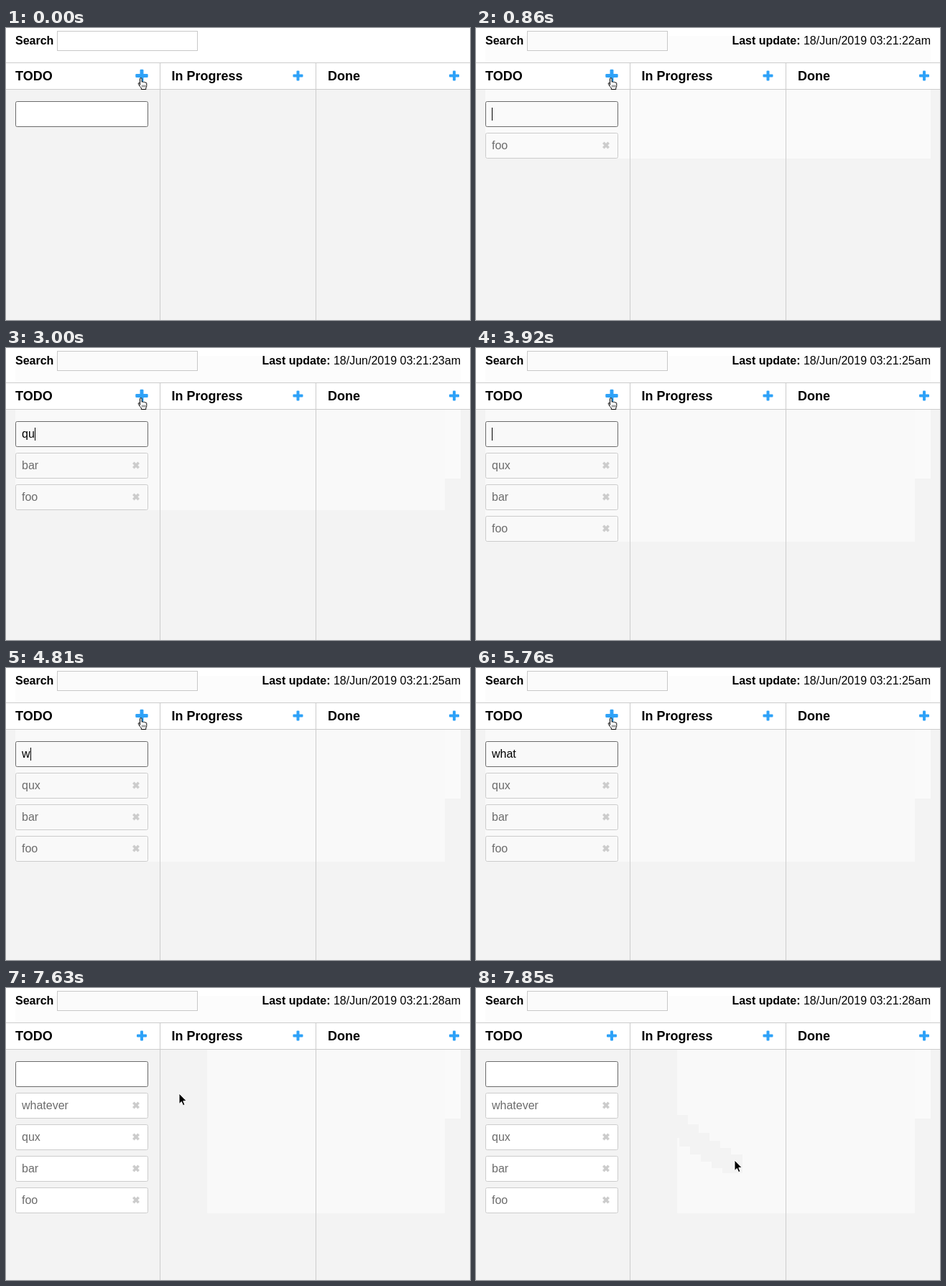
These frames come from a looping animation (646 px wide and 407 px high, 8000 ms). An HTML page:

```html
<!DOCTYPE html>
<html lang="en">
<head>
<meta charset="utf-8">
<title>Task board</title>
<style>
html, body { margin: 0; width: 100%; height: 100%; overflow: hidden; background: #fff; }
svg { display: block; font: 16px "Liberation Sans", Arial, sans-serif; }
.bold { font-weight: bold; }
.head { font-weight: bold; font-size: 18px; }
</style>
</head>
<body>
<svg id="stage" width="646" height="407" viewBox="0 0 646 407"></svg>
<script>
const LOOP = 8000, MOVE_START = 7510, MOVE_STEPS = 12, MOVE_STEP_MS = 28.3;
const GREY = '#f3f3f3';

// Input log: a letter types, '\n' submits, '' blinks the caret off.
const KEYS = [
  [60, 'f'], [200, 'o'], [350, 'o'], [860, '\n'], [1330, ''],
  [1780, 'b'], [1870, 'a'], [1950, 'r'], [2190, '\n'], [2700, ''],
  [2820, 'q'], [3000, 'u'], [3180, 'x'], [3650, ''], [3920, '\n'], [4390, ''],
  [4810, 'w'], [5020, 'h'], [5070, 'a'], [5250, 't'], [5760, ''],
  [5820, 'e'], [6020, 'v'], [6050, 'e'], [6190, 'r'], [6700, ''],
  [7060, '\n'], [7510, '']
];
const SECONDS = [22, 23, 25, 28];

const stage = document.getElementById('stage');
const pen = document.createElement('canvas').getContext('2d');
pen.font = '16px "Liberation Sans", Arial, sans-serif';

const rect = (x, y, w, h, fill, more = '') =>
  `<rect x="${x}" y="${y}" width="${w}" height="${h}" fill="${fill}" ${more}/>`;
const box = (x, y, w, h, fill, stroke, r = 0) =>
  rect(x + .5, y + .5, w - 1, h - 1, fill, `stroke="${stroke}" rx="${r}"`);
const text = (x, y, str, more = '') => `<text x="${x}" y="${y}" ${more}>${str}</text>`;

const plus = (x, scale) => `<g transform="translate(${x} 66.5) scale(${scale})" fill="#2ea2f8">
  <rect x="-7" y="-2" width="14" height="4" rx="1"/>
  <rect x="-2" y="-7" width="4" height="14" rx="1"/></g>`;

const card = (label, i, fill) => {
  const y = 146 + 44 * i;
  return box(13, y, 185, 36, fill, '#ccc', 2) +
    text(22, y + 23, label, 'fill="#6c6c6c"') +
    `<path transform="translate(181 ${y + 17.5})" d="M-3.7-3.7L3.7 3.7M3.7-3.7L-3.7 3.7" stroke="#ccc" stroke-width="3.6"/>`;
};

const hand = `<g transform="translate(183 69)" stroke="#000">
  <path fill="#fff" d="M3.5 10.5V1.9a1.3 1.3 0 0 1 2.6 0V6.2q1.3-.8 2.4.3 1.4-.6 2.2.5 1.9-.5 2.1 1.5v3q0 1.6-1 3v2H5.3v-1.8q-2-2-3.9-5.4-.7-1.6.6-1.8.8 0 1.5 1.3z"/>
  <path d="M6.6 10.5v3M8.6 10.5v3M10.6 10.5v3" stroke-width=".7"/></g>`;

const arrow = ([x, y]) => `<path transform="translate(${x} ${y})" stroke="#fff"
  d="M0 0V14.5l3.3-3 2.3 5.2 2.4-1L5.8 10.6H10.3z"/>`;

// Pointer path: a quadratic curve from the button to its resting place.
const pointer = step => {
  const u = step / MOVE_STEPS, v = 1 - u;
  const curve = (a, b, c) => Math.round(v * v * a + 2 * u * v * b + u * u * c);
  return [curve(187, 265, 360), curve(70, 200, 240)];
};

function stateAt(t) {
  const s = { typed: '', items: [], caret: false };
  for (const [at, key] of KEYS) {
    if (at > t) break;
    s.caret = key !== '';
    if (key === '\n') {
      s.items.unshift(s.typed);
      s.typed = '';
    } else {
      s.typed += key;
    }
  }
  s.step = t < MOVE_START ? -1 : Math.min(MOVE_STEPS, Math.floor((t - MOVE_START) / MOVE_STEP_MS));
  return s;
}

// Lighter areas left by each board refresh, and the grey the pointer wipes back.
function shading({ items, step }) {
  const n = items.length;
  if (!n) return '';
  let out = rect(13, 11, 620, 37, '#fcfcfc') + rect(13, 86, 620, 96, '#fafafa');
  if (n > 1) out += rect(13, 86, 598, 52 + 44 * n, '#f9f9f9');
  if (step >= 0) out += rect(13, 86, 267, 228, GREY);
  for (let i = 1; i <= step; i++) {
    const [x0, y0] = pointer(i - 1), [x1, y1] = pointer(i);
    out += rect(x0 - 1, y0 - 1, x1 - x0 + 12, y1 - y0 + 19, GREY);
  }
  return out;
}

function draw(t) {
  const s = stateAt(t), n = s.items.length, moving = s.step > 0;
  const fill = !n || s.step >= 0 ? '#fff' : n > 1 ? '#f9f9f9' : '#fafafa';
  let out = rect(0, 0, 646, 407, '#fff') + rect(0, 86, 646, 321, GREY) + shading(s);

  out += rect(0, 48, 646, 38, '#fff') + rect(0, 48, 646, 1, '#ccc') + rect(0, 85, 646, 1, '#ccc');
  out += rect(214, 49, 1, 358, '#ccc') + rect(431, 49, 1, 358, '#ccc');
  ['TODO', 'In Progress', 'Done'].forEach((name, i) => {
    out += text(13 + 217.5 * i, 73, name, 'class="head"');
    out += plus(189 + 217.5 * i, i || moving ? 1 : 1.24);
  });

  out += text(13, 23, 'Search', 'class="bold"') + box(71, 4, 196, 28, n ? '#fbfbfb' : '#fff', '#c8c8c8');
  if (n) {
    out += text(633, 23, `<tspan class="bold">Last update:</tspan> 18/Jun/2019 03:21:${SECONDS[n - 1]}am`,
      'text-anchor="end"');
  }

  out += box(13, 102, 185, 36, fill, '#6b6b6b', 2) + text(22, 125, s.typed);
  if (s.caret) out += rect(Math.round(22 + pen.measureText(s.typed).width), 111, 1, 18, '#000');
  s.items.forEach((label, i) => out += card(label, i, fill));

  stage.innerHTML = out + (moving ? arrow(pointer(s.step)) : hand);
}

const start = performance.now();
function tick() {
  draw((performance.now() - start) % LOOP);
  requestAnimationFrame(tick);
}
tick();
</script>
</body>
</html>
```
